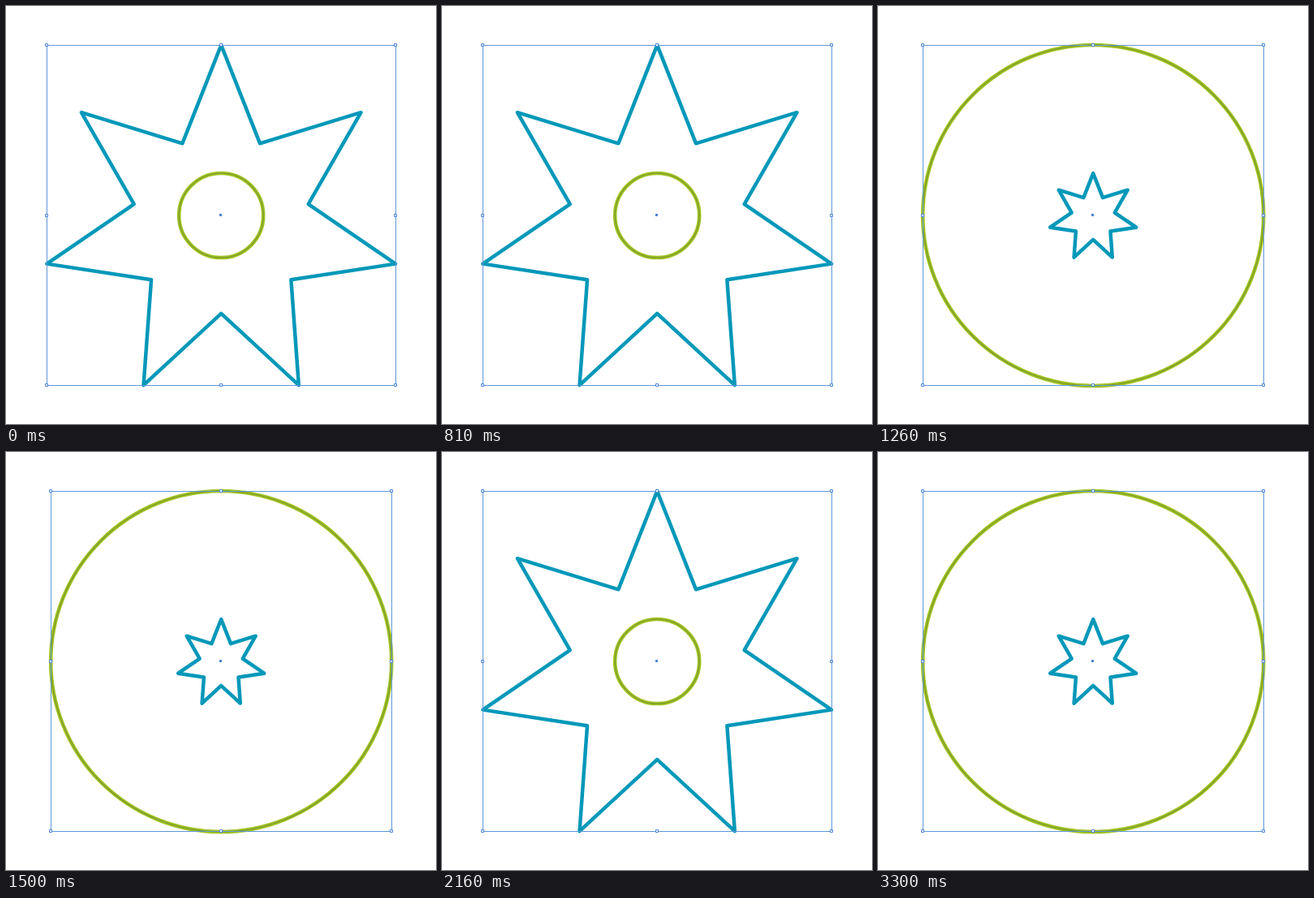
Animation, 530 px wide and 515 px high, one loop 4.08 s. Source, as an HTML page with a canvas:

```html
<!DOCTYPE html>
<html lang="en">
<head>
<meta charset="utf-8">
<title>Star and circle</title>
<style>
  html, body { margin: 0; width: 100%; height: 100%; overflow: hidden; background: #fff; }
  canvas { display: block; }
</style>
</head>
<body>
<canvas id="stage" width="530" height="515"></canvas>
<script>
const ctx = document.getElementById('stage').getContext('2d');
const LOOP = 4080;
const CX = 265.2, CY = 258;
const TEAL = '#0498b9', GREEN = '#a2c424', OLIVE = '#76922c', BLUE = '#4f86dc';

function stroke(path, color, width) {
  ctx.strokeStyle = color;
  ctx.lineWidth = width;
  ctx.stroke(path);
}

function star(cy, radius) {
  const path = new Path2D();
  for (let i = 0; i < 14; i++) {
    const angle = i * Math.PI / 7;
    const r = i % 2 ? radius / 2 : radius;
    path.lineTo(CX + r * Math.sin(angle), cy - r * Math.cos(angle));
  }
  path.closePath();
  stroke(path, TEAL, 4.5);
}

function circle(radius) {
  const path = new Path2D();
  path.arc(CX, CY, radius, 0, 2 * Math.PI);
  stroke(path, GREEN, 4.6);
  stroke(path, OLIVE, 1.1);
}

function selection(left, right) {
  const top = 48.5, bottom = 467.5;
  const xs = [left, 265.5, right], ys = [top, 258.5, bottom];
  ctx.lineWidth = 1;
  ctx.strokeStyle = '#5f97d8';
  ctx.strokeRect(left, top, right - left, bottom - top);
  ctx.strokeStyle = BLUE;
  ctx.fillStyle = '#fff';
  xs.forEach((x, i) => ys.forEach((y, j) => {
    if (i === 1 && j === 1) return;
    ctx.fillRect(x - 2, y - 2, 3, 3);
    ctx.strokeRect(x - 2, y - 2, 3, 3);
  }));
  ctx.fillStyle = BLUE;
  ctx.fillRect(263, 256, 3, 3);
}

function draw(now) {
  const t = now % LOOP;
  const circleOutside = (t >= 1260 && t < 2160) || t >= 3150;
  ctx.fillStyle = '#fff';
  ctx.fillRect(0, 0, 530, 515);
  ctx.lineJoin = 'round';
  if (circleOutside) {
    circle(210);
    star(260.6, 54.4);
    selection(55.5, 475.5);
  } else {
    star(268.6, 220.4);
    circle(52);
    selection(50.5, 480.5);
  }
}

const start = performance.now();
function tick() {
  draw(performance.now() - start);
  requestAnimationFrame(tick);
}
tick();
</script>
</body>
</html>
```
